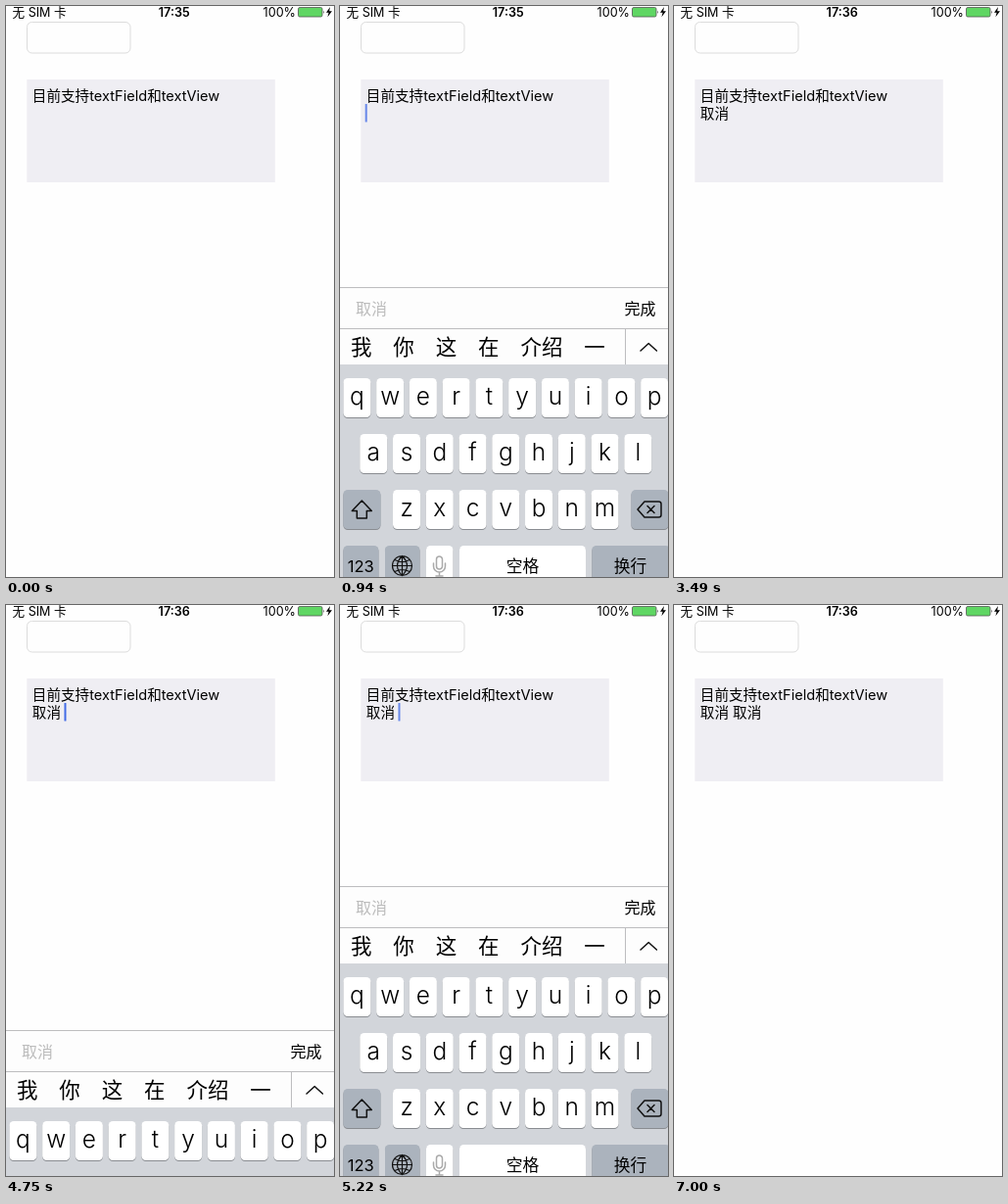
Animation of 335x583 px, one loop 8000 ms. Source, as an HTML page:

```html
<!DOCTYPE html>
<html lang="zh-CN">
<head>
<meta charset="utf-8">
<style>
html, body { margin: 0; width: 100%; height: 100%; overflow: hidden; background: #fefefe; }
svg { display: block; font-family: Inter, "Noto Sans CJK SC", "Noto Sans CJK", sans-serif; }
.line { fill: none; stroke: #111; stroke-width: 1.5; stroke-linejoin: round; stroke-linecap: round; }
</style>
</head>
<body>
<svg width="335" height="583" viewBox="0 0 335 583">
  <g font-size="12.6">
    <text x="6.5" y="10.7">无 SIM 卡</text>
    <text id="clock" x="171.7" y="10.6" font-weight="600" text-anchor="middle"></text>
    <text x="296" y="10.6" text-anchor="end">100%</text>
  </g>
  <rect x="298.5" y="1.5" width="24.5" height="9.5" rx="1.5" fill="#5fd663" stroke="#555" stroke-width=".8"/>
  <path d="M324.3 4.5q1.6 1.7 0 3.6z" fill="#444"/>
  <path d="M331 1l-4 5.8h2.6l-1.2 4.4 4.6-6h-2.8z"/>

  <rect x="21.5" y="16.5" width="105.5" height="31.5" rx="5" fill="#fefefe" stroke="#dcdcdc"/>
  <path d="M21.3 75h253.500v105h-253.500z" fill="#efeef3"/>
  <g font-size="14.6">
    <text x="26.8" y="97.1">目前支持textField和textView</text>
    <text id="line2" x="26.8" y="115.2"></text>
  </g>
  <rect id="caret" y="100" width="2" height="18.5" rx=".5" fill="#426be6"/>
  <g id="keyboard"></g>
</svg>
<script>
const el = id => document.getElementById(id);
const text = (x, y, size, str, attrs = 'text-anchor="middle"') =>
  `<text x="${x}" y="${y}" font-size="${size}" ${attrs}>${str}</text>`;
const box = (x, y, w, h, fill, rx = 0) =>
  `<rect x="${x}" y="${y}" width="${w}" height="${h}" rx="${rx}" fill="${fill}"/>`;
const key = (x, y, w, fill = '#fff') =>
  box(x, y + 1, w, 40, '#898c91', 4.5) + box(x, y, w, 40, fill, 4.5);
const line = (d, attrs = '') => `<path class="line" d="${d}" ${attrs}/>`;

const GRAY = '#abb3bd', RULE = '#bdbdbf';
const PITCH = 33.75, TOP = 380, ROW = 57;

const letterRow = (letters, r) => [...letters].map((c, i) => {
  const x = 172.15 + PITCH * (i - letters.length / 2), y = TOP + ROW * r;
  return key(x, y, 28) + text(x + 14, y + 27.3, 24.5, c, 'text-anchor="middle" font-weight="300"');
}).join('');

el('keyboard').innerHTML =
  // toolbar and candidates
  box(0, 287, 335, 80, '#fdfdfd') + box(0, 287, 335, 1, RULE) + box(0, 329, 335, 1, RULE) +
  text(16, 314.8, 16, '取消', 'fill="#bcbcbc"') + text(290.5, 314.8, 16, '完成', '') +
  text(11, 356.2, 21.5, '我 你 这 在 介绍 一', 'word-spacing="15.8"') +
  box(291, 330, 1, 37, RULE) + line('M307 352l8.2-7.5 8.2 7.5') +
  // keys
  box(0, 366, 335, 217, '#d2d5da') +
  ['qwertyuiop', 'asdfghjkl', 'zxcvbnm'].map(letterRow).join('') +
  key(3.4, 494, 38, GRAY) + key(297.5, 494, 38, GRAY) +
  key(3.4, 551, 36, GRAY) + key(46, 551, 35.5, GRAY) + key(88, 551, 27.5) +
  key(122, 551, 129) + key(257.3, 551, 80, GRAY) +
  text(21.2, 578, 16.5, '123') + text(186.5, 578.3, 16.8, '空格') + text(296.5, 578.3, 16.8, '换行') +
  // shift, delete, globe, microphone
  line('M22.3 505l-10 10.5h5v7.5h10v-7.5h5z') +
  line('M304 514l7-8h14.5q2.5 0 2.5 2.5v11q0 2.5-2.5 2.5H311zM314 510.5l7 7m0-7l-7 7') +
  line('M53.5 571.5a10 10 0 0 1 20 0a10 10 0 0 1-20 0zh20M63.5 561.5v20' +
       'q-10-10 0-20q10 10 0 20M56 565.5q7.5 4 15 0M56 577.5q7.5-4 15 0', 'style="stroke-width:1.2"') +
  line('M98.5 565a3 3 0 0 1 6 0v7a3 3 0 0 1-6 0zM95.5 569v3a6 6 0 0 0 12 0v-3M101.5 578v4M98 582h7',
       'style="stroke:#aaa"');

const LOOP = 8000, TRAVEL = 296, BLINK = 985;

// Each slide jumps into view at its time, already `lead` ms under way.
const visits = [
  { show: 470, showLead: 43, hide: 3080, hideLead: 137, caretX: 25.7 },
  { show: 4750, showLead: 97, hide: 6700, hideLead: 264, caretX: 59.5 }
];

// Critically damped spring: share of the way still to go.
function remaining(ms) {
  const s = .0172 * ms;
  return (1 + s) * Math.exp(-s);
}

function keyboardDrop(t, v) {
  if (t < v.show) return TRAVEL;
  return TRAVEL * (t < v.hide
    ? remaining(t - v.show + v.showLead)
    : 1 - remaining(t - v.hide + v.hideLead));
}

function caretOpacity(t, v) {
  if (t < v.show || t >= v.hide) return 0;
  const phase = Math.max(0, t - v.show - 245) / BLINK;
  return Math.min(1, Math.max(0, .5 + 2.2 * Math.cos(2 * Math.PI * phase)));
}

function draw(t) {
  const visit = visits[t < 4000 ? 0 : 1];
  const drop = keyboardDrop(t, visit);
  el('keyboard').setAttribute('transform', `translate(0 ${Math.round(drop)})`);
  el('keyboard').setAttribute('visibility', drop > TRAVEL - 1 ? 'hidden' : 'visible');
  el('caret').setAttribute('opacity', caretOpacity(t, visit));
  el('caret').setAttribute('x', visit.caretX);
  el('line2').textContent = visits.filter(v => t >= v.hide).map(() => '取消').join(' ');
  el('clock').textContent = t < 3370 ? '17:35' : '17:36';
}

const start = performance.now();
function tick() {
  draw((performance.now() - start) % LOOP);
  requestAnimationFrame(tick);
}
tick();
</script>
</body>
</html>
```
